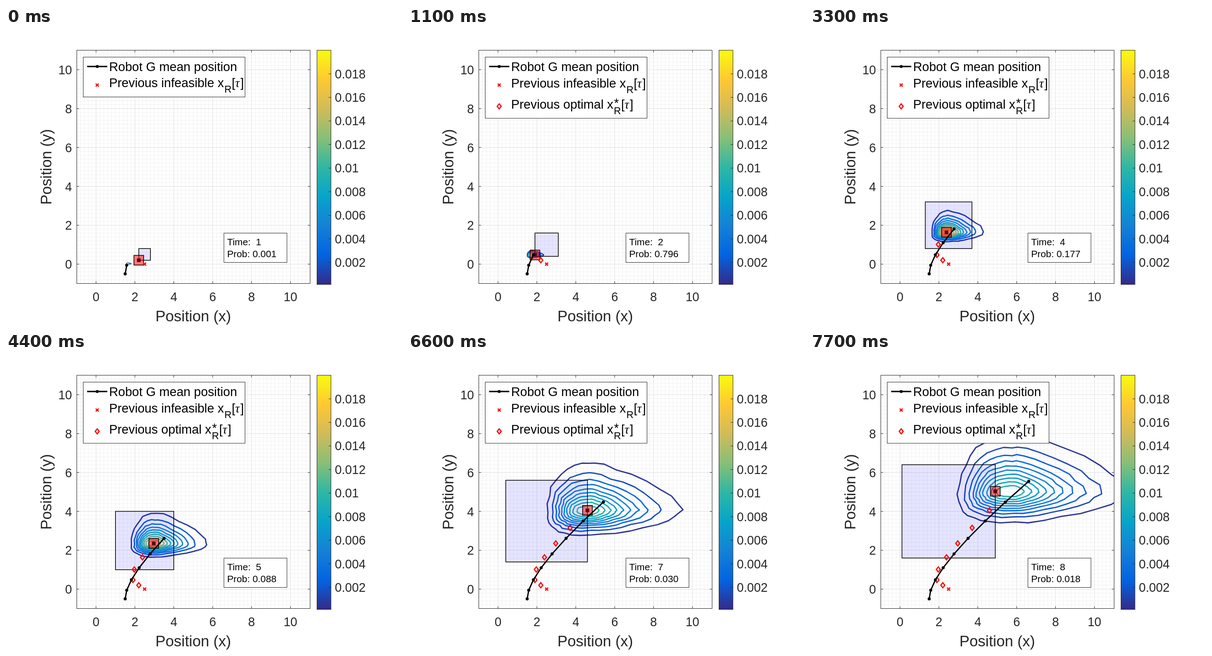
Animation of 864 by 648 pixels, one loop 8000 ms. Source, as an HTML page:

```html
<!DOCTYPE html>
<html lang="en">
<head>
<meta charset="utf-8">
<title>Robot position plot</title>
<style>
  html, body { margin: 0; width: 100%; height: 100%; overflow: hidden; background: #fff; }
  svg { display: block; width: 100%; height: 100%; }
  text { font-family: "Liberation Sans", Arial, sans-serif; white-space: pre; }
  .tick { font-size: 26.8px; fill: #262626; }
  .label { font-size: 33px; fill: #262626; text-anchor: middle; }
  .legend { font-size: 27.3px; }
  .sub { font-size: 21.6px; }
  .tau { font-family: "Liberation Serif", "Times New Roman", serif; font-style: italic; }
  .note { font-size: 20.8px; }
  .red { fill: none; stroke: #f00; stroke-width: 2.5; }
  .frame { stroke: #262626; stroke-width: 1; }
  .contour { fill: none; stroke-linejoin: round; }
  .area { stroke: #000; stroke-width: 1.5; }
</style>
</head>
<body>
<svg viewBox="0 0 864 648">
  <defs>
    <clipPath id="plot"><rect x="154" y="48" width="509.5" height="510"/></clipPath>
    <linearGradient id="bar" x1="0" y1="1" x2="0" y2="0"></linearGradient>
  </defs>
  <g id="axes"></g>
  <g id="scene" clip-path="url(#plot)"></g>
  <g id="legend"></g>
  <g id="note"></g>
</svg>
<script>
const LOOP = 8000, STEP = 1100, LEVELS = 10;
const $ = id => document.getElementById(id);
const X = x => 196.4 + 42.42 * x;
const Y = y => 515.2 - 42.42 * y;
const clamp = (v, lo, hi) => Math.max(lo, Math.min(hi, v));
const range = (n, f) => Array.from({ length: n }, (_, i) => f(i));

const prob = ['0.001', '0.796', '0.388', '0.177', '0.088', '0.049', '0.030', '0.018'];
const ramp = ['#352a87', '#0363e1', '#1481d6', '#06a4ca', '#2eb7a4',
  '#87bf77', '#d1bb59', '#fec832', '#f9fb0e'];

// Model at time t: mean path, most likely place, and the chaser kept inside its reach
const mean = t => [1.5 + .08 * t * t, -.5 + .4 * t + .0445 * t * t];
const mode = t => {
  const [x, y] = mean(t);
  return [x - .14 * t + .17, y - .085 * t + .165];
};
const chaser = t => {
  const [x, y] = mode(t);
  return [clamp(x, 2.5 - .3 * t, 2.5 + .3 * t), clamp(y, .2 * t, .8 * t)];
};

function color(v) {
  const s = clamp(v, 0, 1) * (ramp.length - 1), i = Math.min(Math.floor(s), ramp.length - 2);
  return `color-mix(in srgb, ${ramp[i + 1]} ${Math.round((s - i) * 100)}%, ${ramp[i]})`;
}

const noise = n => {
  const s = Math.sin(n * 127.1 + 3.7) * 43758.5453;
  return (s - Math.floor(s)) * 2 - 1;
};
const line = (x1, y1, x2, y2) => `M${x1} ${y1}L${x2} ${y2}`;
const path = (d, attrs) => `<path d="${d}" ${attrs}/>`;
const text = (x, y, s, cls, attrs = '') => `<text x="${x}" y="${y}" class="${cls}" ${attrs}>${s}</text>`;
const rect = (x, y, w, h, attrs) => `<rect x="${x}" y="${y}" width="${w}" height="${h}" ${attrs}/>`;
const square = (x, y, r, attrs) => rect(x - r, y - r, 2 * r, 2 * r, attrs);
const dot = (x, y) => `<circle cx="${x}" cy="${y}" r="3.3"/>`;
const cross = (x, y) => path(`M${x - 3.2} ${y - 3.2}l6.4 6.4m0 -6.4l-6.4 6.4`, 'class="red"');
const diamond = (x, y) => path(`M${x} ${y - 5.6}l4.4 5.6l-4.4 5.6l-4.4 -5.6z`, 'class="red"');
const curve = (v, p) => Math.sign(v) * Math.abs(v) ** (2 / p);

// Closed contour: four superellipse quarters that spread at different rates
function contour(t, k) {
  const [mx, my] = mode(t), f = 1 - Math.log(k + 1) / Math.log(LEVELS + 1);
  const left = 3.2 * t ** 1.75 * f ** .36, right = 7.8 * t ** 1.66 * f ** .75;
  const up = Math.max(2, 19.3 * t - 29.5) * f ** .72, down = 1.8 * t ** 1.75 * f ** .55;
  const n = 36;
  const points = range(n, i => {
    const a = (i + .2) / n * 2 * Math.PI, c = Math.cos(a), s = Math.sin(a);
    const [px, py] = c < 0 ? (s > 0 ? [2, 2] : [2.8, 2.8]) : (s > 0 ? [1.22, 1.6] : [1.5, 1.7]);
    const r = 1 + .025 * noise(i + t * 40) + .015 * noise(i + k * 57 + t * 9);
    return [X(mx) + t + curve(c, px) * (c > 0 ? right : left) * r,
      Y(my) - curve(s, py) * (s > 0 ? up : down) * r].map(v => v.toFixed(1));
  });
  return 'M' + points.join('L') + 'z';
}

function drawAxes() {
  let minor = '', major = '', ticks = '', out = '';
  for (let i = -4; i < 55; i++) {
    if (i % 10 === 0) continue;
    const v = i / 5;
    minor += line(X(v), 48.5, X(v), 557.5) + line(154.5, Y(v), 663.5, Y(v));
  }
  for (let v = 0; v <= 10; v += 2) {
    const x = X(v), y = Y(v);
    major += line(x, 48.5, x, 557.5) + line(154.5, y, 663.5, y);
    ticks += line(x, 557.5, x, 552.5) + line(x, 48.5, x, 53.5)
      + line(154.5, y, 159.5, y) + line(663.5, y, 658.5, y);
    out += text(x, 596, v, 'tick', 'text-anchor="middle"')
      + text(144, y + 10, v, 'tick', 'text-anchor="end"');
  }
  out = path(minor, 'stroke="#d6d6d6" stroke-dasharray="1 2"')
    + path(major, 'stroke="#dedede"') + path(ticks, 'class="frame"') + out
    + rect(154.5, 48.5, 509, 509, 'fill="none" class="frame"')
    + rect(678.5, 48.5, 30.5, 511, 'fill="url(#bar)" class="frame"');
  for (let i = 1; i < 10; i++) {
    const y = 562.8 - 51.42 * i;
    out += path(line(709, y, 704, y), 'class="frame"')
      + text(717.5, y + 9.6, +(i * .002).toFixed(3), 'tick');
  }
  out += text(408.5, 640, 'Position (x)', 'label')
    + text(0, 0, 'Position (y)', 'label', 'transform="translate(99 303) rotate(-90)"');
  $('axes').innerHTML = out;
  $('bar').innerHTML = ramp.map((c, i) =>
    `<stop offset="${i / (ramp.length - 1)}" stop-color="${c}"/>`).join('');
}

const bracket = (x, y) => text(x, y, '[', 'legend') + text(x + 7.5, y, 'τ', 'legend tau')
  + text(x + 19, y, ']', 'legend');

function drawLegend(t) {
  const full = t > 1, y = full ? 130 : 129;
  let out = rect(168.5, 63.5, 353, full ? 133.5 : 87, 'fill="#fff" class="frame"')
    + path(line(177, 84, 221, 84), 'stroke="#000" stroke-width="2.8"') + dot(199, 84)
    + text(225, 94, 'Robot G mean position', 'legend')
    + cross(199, 124.5) + text(225, y, 'Previous infeasible x', 'legend')
    + text(476.5, y + 12, 'R', 'legend sub') + bracket(492.5, y);
  if (full) out += diamond(199, 171) + text(225, 176, 'Previous optimal x', 'legend')
    + text(449, 188, 'R', 'legend sub') + text(449.5, 172.5, '*', 'legend') + bracket(465, 176);
  $('legend').innerHTML = out;
}

function drawScene(t) {
  const place = ([x, y]) => [X(x), Y(y)];
  const [x, y] = place(chaser(t));
  const trail = range(t + 1, i => place(mean(i)));
  const rings = range(LEVELS, k => path(contour(t, k),
    `class="contour" stroke-width="${Math.min(2.8, 1.2 * t)}" style="stroke:${color(Math.min(1, 3.8 / t) * (.04 + .1 * k))}"`));
  $('scene').innerHTML = rings.join('')
    + square(X(2.5), Y(.5 * t), 12.73 * t, 'class="area" fill="#00f" fill-opacity=".1"')
    + square(x, y, 10.6, 'class="area" fill="#f00" fill-opacity=".5"')
    + square(x, y, 4, 'fill="#60000c"')
    + cross(X(2.5), Y(0))
    + range(t - 1, i => diamond(...place(chaser(i + 1)))).join('')
    + path('M' + trail.join('L'), 'fill="none" stroke="#000" stroke-width="2.8"')
    + trail.map(p => dot(...p)).join('');
  $('note').innerHTML = rect(475.5, 447.5, 137.5, 64, 'fill="#fff" class="frame"')
    + text(482.5, 473.5, 'Time:  ' + t, 'note') + text(482.5, 500, 'Prob: ' + prob[t - 1], 'note');
}

let shown = 0;
function render(ms) {
  const t = Math.floor(ms % LOOP / STEP) + 1;
  if (t === shown) return;
  shown = t;
  drawScene(t);
  drawLegend(t);
}

drawAxes();
render(0);
const start = performance.now();
function tick() {
  render(performance.now() - start);
  requestAnimationFrame(tick);
}
requestAnimationFrame(tick);
</script>
</body>
</html>
```
